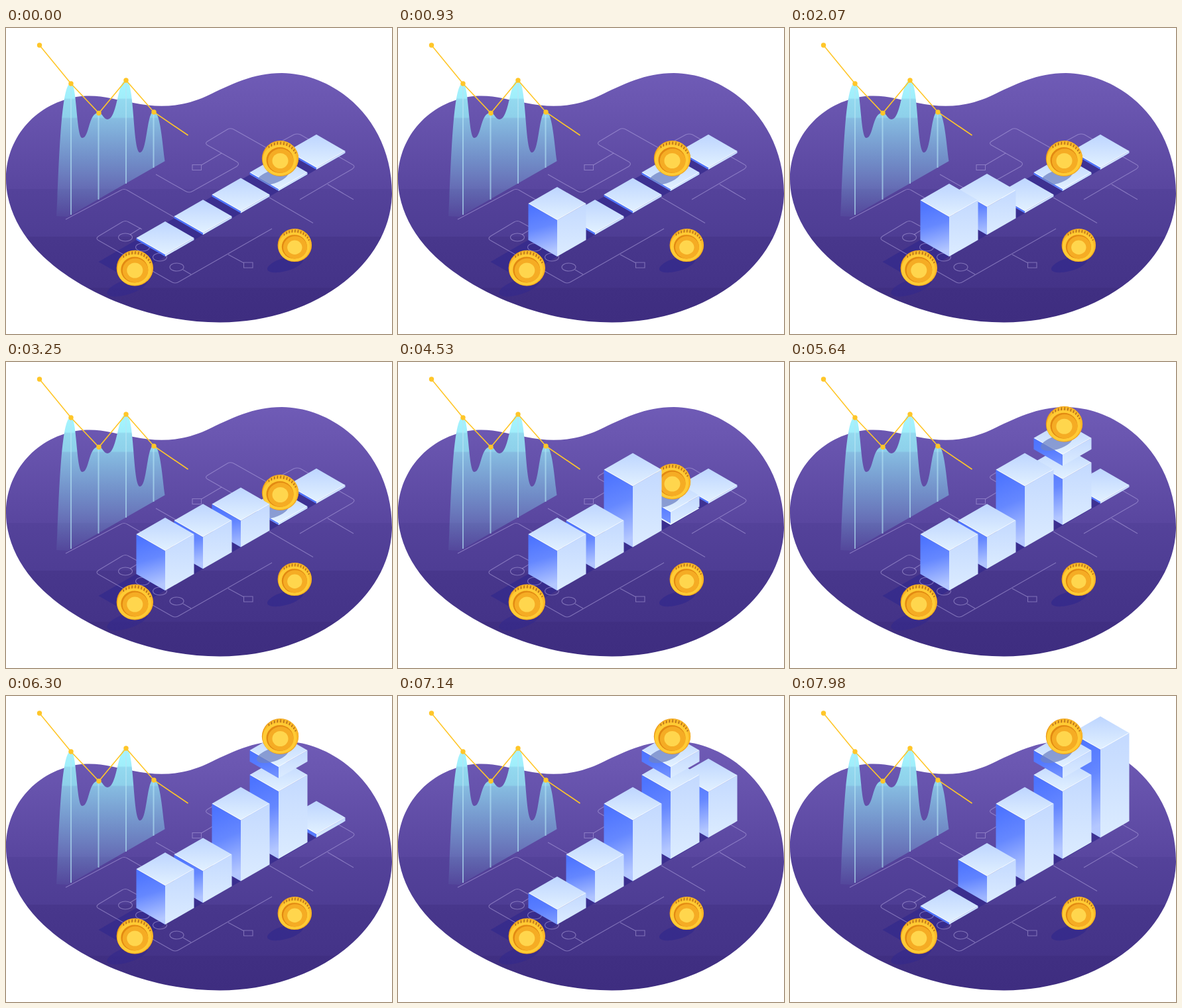
These frames come from a looping animation (582x462 px, 8 s). An HTML page:

```html
<!DOCTYPE html>
<html lang="en">
<head>
<meta charset="utf-8">
<title>Rising blocks</title>
<style>
  html, body { margin: 0; width: 100%; height: 100%; overflow: hidden; background: #fff; }
  svg { display: block; width: 100%; height: 100%; }
</style>
</head>
<body>
<svg viewBox="0 0 582 462" xmlns="http://www.w3.org/2000/svg">
  <defs>
    <linearGradient id="blob" gradientUnits="userSpaceOnUse" x1="0" y1="68" x2="0" y2="445">
      <stop offset="0" stop-color="#6f5bb6"/>
      <stop offset=".1" stop-color="#6b57b1"/>
      <stop offset=".463" stop-color="#59469f"/>
      <stop offset=".465" stop-color="#54429a"/>
      <stop offset=".654" stop-color="#4e3d94"/>
      <stop offset=".656" stop-color="#48378c"/>
      <stop offset=".858" stop-color="#443388"/>
      <stop offset=".861" stop-color="#402f82"/>
      <stop offset="1" stop-color="#3e2d80"/>
    </linearGradient>
    <linearGradient id="area" gradientUnits="userSpaceOnUse" x1="0" y1="79" x2="0" y2="285">
      <stop offset="0" stop-color="#a6f5ff"/>
      <stop offset=".13" stop-color="#a0eefb"/>
      <stop offset=".14" stop-color="#93d9ef"/>
      <stop offset=".27" stop-color="#8ed0ea"/>
      <stop offset=".28" stop-color="#8ccfea" stop-opacity=".85"/>
      <stop offset=".6" stop-color="#7fbfe2" stop-opacity=".55"/>
      <stop offset="1" stop-color="#7fbfe2" stop-opacity=".06"/>
    </linearGradient>
    <linearGradient id="top" x1="0" y1="0" x2="0" y2="1">
      <stop offset="0" stop-color="#bdd5ff"/>
      <stop offset="1" stop-color="#e2f1ff"/>
    </linearGradient>
    <linearGradient id="glow" x1="0" y1="0" x2=".15" y2="1">
      <stop offset=".1" stop-color="#c6d6ff" stop-opacity="0"/>
      <stop offset=".5" stop-color="#c6d6ff" stop-opacity=".2"/>
      <stop offset="1" stop-color="#c6d6ff" stop-opacity=".85"/>
    </linearGradient>
    <linearGradient id="right" x1="0" y1="0" x2="0" y2="1">
      <stop offset="0" stop-color="#c3d9ff"/>
      <stop offset="1" stop-color="#dcecff"/>
    </linearGradient>
    <clipPath id="ground"><path d="M360 0H462V221H454.5L411 246L367.5 221H360Z"/></clipPath>
  </defs>

  <path fill="url(#blob)" d="M0 228C0 170 40 116 106 104C140 99 162 108 192 113C230 121 264 120 302 103C340 85 372 68 416 68C500 69 582 142 582 250C580 360 460 445 322 444.500C200 444.500 88 385 40 328C14 297 0 262 0 228Z"/>

  <g id="shade" fill="#33298c" fill-opacity=".72">
    <ellipse transform="translate(183 391) rotate(-18)" rx="32" ry="11" fill-opacity=".6"/>
    <ellipse transform="translate(421 357) rotate(-16)" rx="28" ry="10"/>
  </g>

  <g fill="none" stroke="#b9aee6" stroke-opacity=".5" stroke-width="1.1">
    <path d="M90 289L173 245Q178 242 183 245L285 304"/>
    <path d="M226 221L270 246Q276 250 282 246L348 209Q353 205 348 202L304 177Q299 174 304 171L334 153Q339 150 345 154L400 185"/>
    <path d="M281 206.500H294.500V214.500H281ZM294.500 207L325 189"/>
    <path d="M410 174L434 161Q439 159 444 161L522 206Q528 209 522 213L443 259M485 236L524 259M397 256L463 294.500"/>
    <path d="M205 304L185 293Q180 290 175 293L140 314Q134 318 140 321L249 383Q255 387 261 383L401 303"/>
    <path d="M187 312L203 302M267 365L279 372M335 342L359 355M358.500 354H372V362H358.500Z"/>
    <ellipse cx="180" cy="316" rx="10.500" ry="6"/>
    <ellipse cx="257.500" cy="361" rx="10.500" ry="6"/>
    <ellipse cx="206" cy="331" rx="10.500" ry="6"/>
    <ellipse cx="232" cy="346" rx="10.500" ry="6"/>
  </g>

  <path fill="url(#area)" d="M76 284C80 215 82 83 98 83C107 83 106 166 115 166C126 166 124 127 140 128C146 129 147 138 153 138C168 138 168 79 181 79C194 79 191 188 202 188C213 188 212 126 223 126C233 126 236 178 239.500 201L93 285Z"/>
  <path stroke="#b5e6f5" stroke-opacity=".62" stroke-width="2" d="M98 84V282M139.500 129V259M181 80V235M222.500 127V211"/>
  <g id="trend" fill="#ffc629"></g>
  <g id="scene"></g>
</svg>
<script>
const NS = "http://www.w3.org/2000/svg";
const LOOP = 8000, HALF_W = 43.5, HALF_H = 25, FLAT = 3;
const $ = id => document.getElementById(id);
const scene = $("scene");

function add(parent, tag, attrs = {}) {
  const el = document.createElementNS(NS, tag);
  for (const k in attrs) el.setAttribute(k, attrs[k]);
  return parent.appendChild(el);
}

// Linear progress from a to b, clamped to 0..1
const ramp = (t, a, b) => Math.min(1, Math.max(0, (t - a) / (b - a)));

// Isometric block standing on its front corner (x, y)
function block(x, parent = scene) {
  const g = add(parent, "g");
  const left = add(g, "path", { fill: "#4d74ff" });
  const glow = add(g, "path", { fill: "url(#glow)" });
  const right = add(g, "path", { fill: "url(#right)" });
  const top = add(g, "path", { fill: "url(#top)" });
  const edge = add(g, "path", { fill: "none", stroke: "#fff", "stroke-opacity": .75 });
  return (y, h) => {
    const l = x - HALF_W, r = x + HALF_W, f = y - h, m = f - HALF_H;
    const side = `M${l} ${m}L${x} ${f}V${y}L${l} ${y - HALF_H}Z`;
    left.setAttribute("d", side);
    glow.setAttribute("d", side);
    // Low blocks keep a plain blue side
    glow.setAttribute("opacity", Math.min(1, h / 50));
    right.setAttribute("d", `M${r} ${m}L${x} ${f}V${y}L${r} ${y - HALF_H}Z`);
    top.setAttribute("d", `M${l} ${m}L${x} ${f - 2 * HALF_H}L${r} ${m}L${x} ${f}Z`);
    edge.setAttribute("d", `M${l + 1} ${m}L${x} ${f - .6}L${r - 1} ${m}`);
  };
}

function coin(x, y, size = 1) {
  const g = add(scene, "g");
  const disc = (cx, cy, rx, ry, fill) => add(g, "ellipse", { cx, cy, rx, ry, fill });
  disc(0, 0, 27.7, 27, "#e99a1b");
  disc(.5, -.3, 26.8, 26.2, "#fbb929");
  for (let i = 0; i < 11; i++) {
    const a = (-132 + i * 11) * Math.PI / 180, c = Math.cos(a), s = Math.sin(a);
    add(g, "path", {
      d: `M${c * 26} ${s * 25.5}L${c * 24 - .5} ${s * 21 + .5}`,
      stroke: "#a8641a", "stroke-width": 1.3
    });
  }
  disc(-1, 2.5, 25.5, 23.5, "#ffcb35");
  disc(-.5, 2.5, 20.5, 19.5, "#e28a12");
  disc(.7, 3.5, 19.3, 18.2, "#f5ac24");
  disc(0, 3.5, 12, 11.5, "#ffd64d");
  const place = cy => g.setAttribute("transform", `translate(${x} ${cy}) scale(${size})`);
  place(y);
  return place;
}

// Bars run from front to back
const bars = [0, 1, 2, 3, 4].map(i => ({ x: 240 + 57 * i, y: 345 - 32.8 * i }));
for (const { x, y } of bars) {
  const l = x - HALF_W, m = y - HALF_H;
  add($("shade"), "path", { d: `M${l} ${m}L${x} ${y}l-57 33L${l - 57} ${m + 33}Z` });
}

const points = [[50.5, 26], [98, 84], [140, 128.5], [181, 79], [223, 127], [274.5, 162]];
add($("trend"), "polyline", {
  points: points.join(" "), fill: "none", stroke: "#ffc629", "stroke-width": 1.6
});
points.slice(0, 5).forEach(([cx, cy]) => add($("trend"), "circle", { cx, cy, r: 3.7 }));

const bar5 = block(bars[4].x);
const lift = add(scene, "g", { "clip-path": "url(#ground)" });
const pillar = block(bars[3].x, lift);
const slab = block(bars[3].x, lift);
const slabShade = add(lift, "ellipse", { rx: 25, ry: 10, fill: "#6f83c4", "fill-opacity": .75 });
const rider = coin(413.5, 197);
const bar3 = block(bars[2].x);
const bar2 = block(bars[1].x);
const bar1 = block(bars[0].x);
coin(194.3, 362.5);
coin(435.3, 328, .93);

function draw(t) {
  bar1(bars[0].y, FLAT + 57 * (ramp(t, 0, 1020) - ramp(t, 6270, 7590)));
  bar2(bars[1].y, FLAT + 45 * ramp(t, 1260, 2190) - 45 * ramp(t, 7820, 8750));
  bar3(bars[2].y, FLAT + 89 * ramp(t, 2590, 4180));
  bar5(bars[4].y, FLAT + 130 * ramp(t, 6270, 7980));

  // The slab leads and the pillar follows it out of the ground
  const up = 136 * ramp(t, 4320, 6060);
  pillar(246, Math.max(0, up - 34));
  slab(260 - up, 17);
  slabShade.setAttribute("transform", `translate(402 ${225 - up}) rotate(-18)`);
  rider(197 - up);
}

const start = performance.now();
function tick(now) {
  draw(Math.max(0, now - start) % LOOP);
  requestAnimationFrame(tick);
}
draw(0);
requestAnimationFrame(tick);
</script>
</body>
</html>
```
